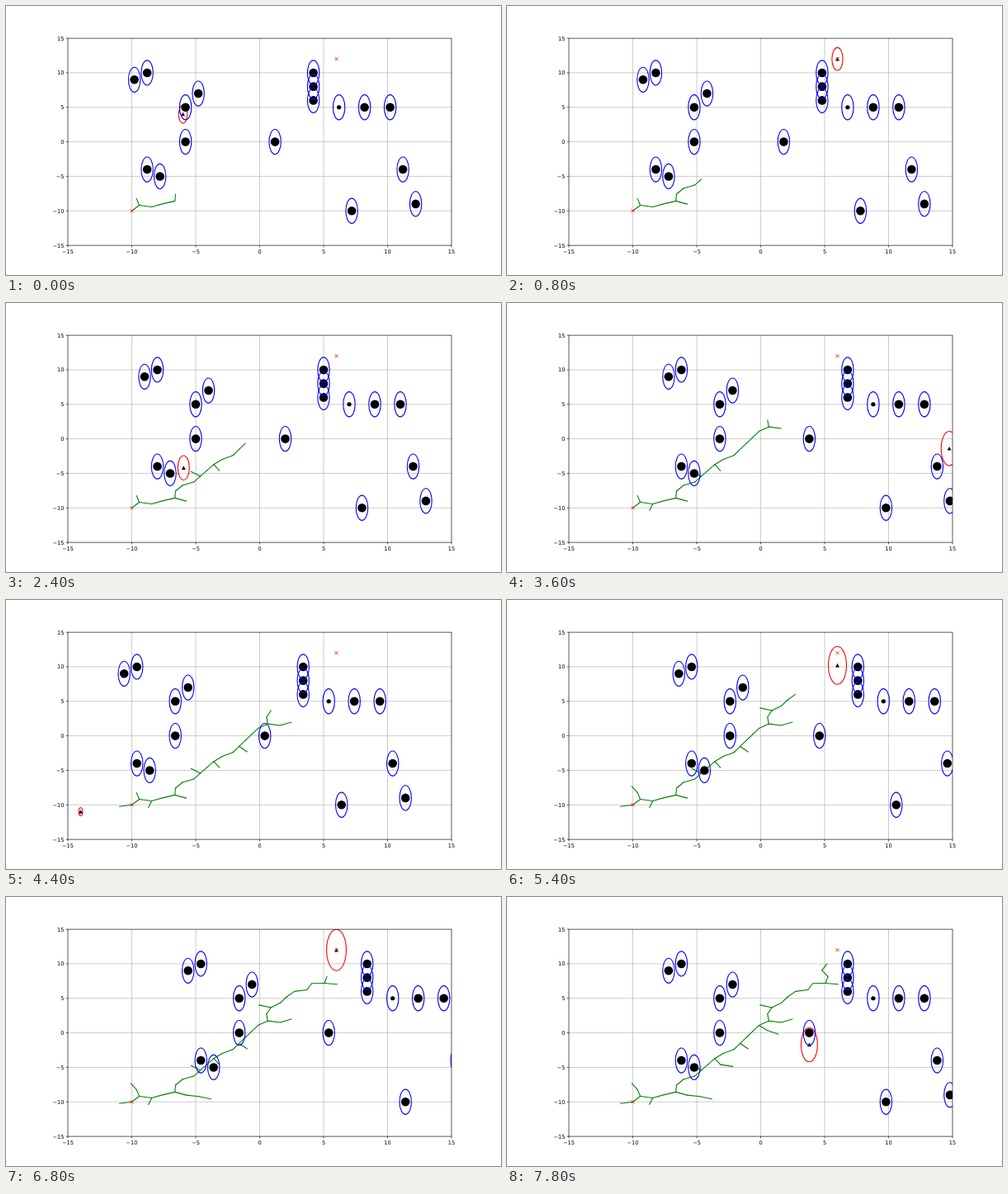
An HTML page with a canvas that plays this animation: 600x326 px, repeating every 8 s.

```html
<!DOCTYPE html>
<html lang="en">
<head>
<meta charset="utf-8">
<title>Tree search among moving obstacles</title>
<style>
  html, body { margin: 0; width: 100%; height: 100%; overflow: hidden; background: #fff; }
  canvas { display: block; width: 100%; height: 100%; }
</style>
</head>
<body>
<canvas id="stage"></canvas>
<script>
const WIDTH = 600, HEIGHT = 326, STEP_MS = 200, STEPS = 40;
const BOX = { left: 75, right: 540, top: 39.1, bottom: 290.1 };
const START = [-10, -10], GOAL = [6, 12];
const FIRST_SHOWN = 6;
const BLUE = '#00f', RED = '#f00', GREEN = '#008000', GRID = '#b0b0b0';
const THIN = 0.65, CURVE = 1.1;

const px = x => BOX.left + (x + 15) / 30 * (BOX.right - BOX.left);
const py = y => BOX.bottom - (y + 15) / 30 * (BOX.bottom - BOX.top);

// Obstacle centres at depth zero
const obstacles = [
  [-11, 9], [-10, 10], [-6, 7], [-7, 5], [-7, 0], [-10, -4], [-9, -5],
  [0, 0], [10, -4], [11, -9], [6, -10]
].map(([x, y]) => ({ x, y, r: 5.3 }));
for (let i = 0; i < 3; i++) {
  obstacles.push({ x: 3, y: 10 - 2 * i, r: 5.3 });
  obstacles.push({ x: 5 + 2 * i, y: 5, r: i ? 5.3 : 2.6 });
}

// Goal-biased samples that pull the tree, in order
const samples = [
  GOAL, [-10.5, -4.5], [-4.5, -10.4], [-3, -6.6], [0, -5.8], [-6, 4],
  GOAL, [-1, -11.4], [1, -3], GOAL, GOAL, GOAL, [7, 8], [6.6, 3.5],
  GOAL, [-3.25, -4.4], GOAL, [-5.95, -4.2],
  GOAL, [-8.75, -10.6], GOAL, [8, 8], [0, 9], [14.75, -1.4],
  [7.8, 4.9], [3.6, 11.2], [-1, -2.3], [-14, -11], [11, 13], [-4, 5.6],
  GOAL, [-11.4, -4.6], [6, 10.2],
  [9.5, 7.6], [-1, -10], GOAL, [11, 7.3], [1, -11.4], [11, 6.3], GOAL,
  [3.4, 11.7], [0.6, 0.25], [-0.25, -5.4], GOAL, [3.8, -1.72]
];

const nodes = [{ x: START[0], y: START[1], depth: 0 }];
for (const sample of samples) {
  const distance = node => Math.hypot(sample[0] - node.x, sample[1] - node.y);
  const parent = nodes.reduce((a, b) => distance(b) < distance(a) ? b : a);
  const length = distance(parent);
  nodes.push({
    x: parent.x + (sample[0] - parent.x) / length,
    y: parent.y + (sample[1] - parent.y) / length,
    depth: parent.depth + 1,
    parent,
    sample
  });
}

const canvas = document.getElementById('stage');
const ctx = canvas.getContext('2d');

function line(x1, y1, x2, y2, color, width) {
  ctx.beginPath();
  ctx.moveTo(x1, y1);
  ctx.lineTo(x2, y2);
  ctx.strokeStyle = color;
  ctx.lineWidth = width;
  ctx.stroke();
}

function disc(x, y, r) {
  ctx.beginPath();
  ctx.arc(x, y, r, 0, 2 * Math.PI);
  ctx.fillStyle = '#000';
  ctx.fill();
}

function ring(x, y, rx, ry, color) {
  ctx.beginPath();
  ctx.ellipse(x, y, rx, ry, 0, 0, 2 * Math.PI);
  ctx.strokeStyle = color;
  ctx.lineWidth = CURVE;
  ctx.stroke();
}

function cross([dataX, dataY]) {
  const x = px(dataX), y = py(dataY), r = 2;
  line(x - r, y - r, x + r, y + r, RED, 0.85);
  line(x - r, y + r, x + r, y - r, RED, 0.85);
}

function triangle(x, y) {
  ctx.beginPath();
  ctx.moveTo(x, y - 2.4);
  ctx.lineTo(x + 2.4, y + 2.2);
  ctx.lineTo(x - 2.4, y + 2.2);
  ctx.fillStyle = '#000';
  ctx.fill();
}

function drawGrid() {
  for (let v = -10; v <= 10; v += 5) {
    line(px(v), BOX.top, px(v), BOX.bottom, GRID, THIN);
    line(BOX.left, py(v), BOX.right, py(v), GRID, THIN);
  }
}

function drawAxes() {
  ctx.strokeStyle = '#000';
  ctx.lineWidth = THIN;
  ctx.strokeRect(BOX.left, BOX.top, BOX.right - BOX.left, BOX.bottom - BOX.top);
  ctx.font = '6.6px "DejaVu Sans", sans-serif';
  ctx.fillStyle = '#000';
  for (let v = -15; v <= 15; v += 5) {
    const label = String(v).replace('-', '\u2212');
    line(px(v), BOX.bottom, px(v), BOX.bottom + 2.3, '#000', THIN);
    line(BOX.left - 2.3, py(v), BOX.left, py(v), '#000', THIN);
    ctx.textAlign = 'center';
    ctx.fillText(label, px(v), 299.8);
    ctx.textAlign = 'right';
    ctx.fillText(label, 70.4, py(v) + 2.5);
  }
}

function drawScene(step) {
  const newest = FIRST_SHOWN + step;
  const { depth, sample } = nodes[newest];
  const sx = px(sample[0]), sy = py(sample[1]);
  const shift = 0.2 * (depth + 1);
  const spread = Math.sqrt(depth);

  ctx.fillStyle = '#fff';
  ctx.fillRect(0, 0, WIDTH, HEIGHT);
  drawGrid();

  ctx.save();
  ctx.beginPath();
  ctx.rect(BOX.left, BOX.top, BOX.right - BOX.left, BOX.bottom - BOX.top);
  ctx.clip();
  ctx.lineCap = 'round';
  for (const { x, y, parent } of nodes.slice(1, newest + 1)) {
    line(px(parent.x), py(parent.y), px(x), py(y), GREEN, CURVE);
  }
  ctx.lineCap = 'butt';
  // Uncertainty grows with the square root of depth
  ring(sx, sy, 2.34 * spread, 4.9 * spread, RED);
  for (const { x, y, r } of obstacles) disc(px(x + shift), py(y), r);
  triangle(sx, sy);
  for (const { x, y } of obstacles) ring(px(x + shift), py(y), 7.2, 15.1, BLUE);
  cross(START);
  cross(GOAL);
  ctx.restore();

  drawAxes();
}

let startTime, shownKey;
function tick(now) {
  startTime ??= now;
  const step = Math.floor((now - startTime) / STEP_MS) % STEPS;
  const w = Math.round(innerWidth * devicePixelRatio);
  const h = Math.round(innerHeight * devicePixelRatio);
  const key = [step, w, h].join();
  if (key !== shownKey) {
    shownKey = key;
    canvas.width = w;
    canvas.height = h;
    ctx.setTransform(w / WIDTH, 0, 0, h / HEIGHT, 0, 0);
    drawScene(step);
  }
  requestAnimationFrame(tick);
}
requestAnimationFrame(tick);
</script>
</body>
</html>
```
